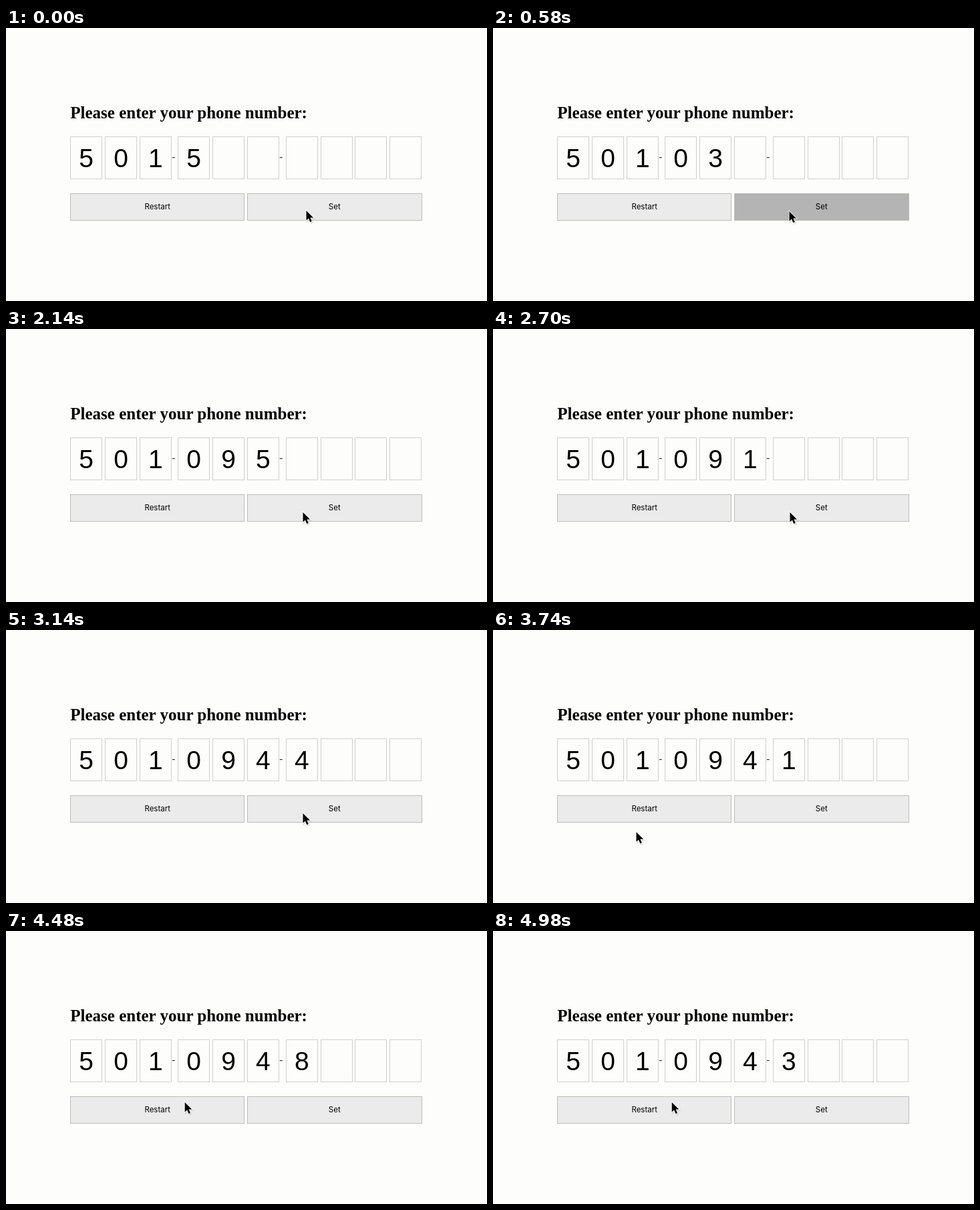
Recreate the animation shown at these times as an HTML page. Size 720 by 408 pixels, loop 5000 ms.

```html
<!DOCTYPE html>
<html lang="en">
<head>
<meta charset="utf-8">
<title>Number picker</title>
<style>
  html, body { margin: 0; width: 100%; height: 100%; overflow: hidden; background: #fdfdfc; }
  svg { display: block; width: 720px; height: 408px; }
  .title { font: bold 25px "Liberation Serif", Times, serif; }
  .digit { font: 39px "Liberation Sans", Arial, sans-serif; text-anchor: middle; }
  .dash { font: 15px "Liberation Serif", Times, serif; fill: #222; }
  .label { font: 11.5px Inter, sans-serif; text-anchor: middle; }
  .box { fill: none; stroke: #cfcfcf; }
  .button { fill: #ebebeb; stroke: #bcbcb8; }
</style>
</head>
<body>
<svg id="stage" viewBox="0 0 720 408">
  <text class="title" x="96.3" y="135">Please enter your phone number:</text>
  <g id="slots"></g>
  <text class="dash" x="248.2" y="196.8">-</text>
  <text class="dash" x="409.2" y="196.8">-</text>
  <rect class="button" x="96.5" y="247.5" width="260" height="40"/>
  <rect class="button" id="set" x="361.5" y="247.5" width="261" height="40"/>
  <text class="label" x="226.7" y="271">Restart</text>
  <text class="label" x="491.8" y="271">Set</text>
  <g id="cursor">
    <path d="M0 0V14.6L3.4 11.4L5.8 17L8.3 16L5.9 10.5H10.6Z" transform="translate(1 1.5)"
      fill="#aaa" stroke="#aaa" stroke-width="2" opacity=".35"/>
    <path d="M0 0V14.6L3.4 11.4L5.8 17L8.3 16L5.9 10.5H10.6Z"
      stroke="#fff" stroke-width="1.6" paint-order="stroke"/>
  </g>
</svg>
<script>
  const LOOP = 5000, TICK = 98.5, PRESS = 115;
  const SVG = "http://www.w3.org/2000/svg";
  const slots = document.getElementById("slots");
  const setButton = document.getElementById("set");
  const cursor = document.getElementById("cursor");

  // Each spinning slot counts up from `first` until the next press.
  const spins = [
    { slot: 3, start: 0, first: 5 },
    { slot: 4, start: 540, first: 3 },
    { slot: 5, start: 1158, first: 6 },
    { slot: 6, start: 2947, first: 3 }
  ];

  const path = [
    { t: 0, x: 449.5, y: 273 },
    { t: 480, x: 443.5, y: 274 },
    { t: 1300, x: 443.5, y: 274 },
    { t: 1700, x: 444.5, y: 274 },
    { t: 3340, x: 444.5, y: 274 },
    { t: 3740, x: 214.5, y: 302 },
    { t: 3800, x: 206, y: 320 },
    { t: 4240, x: 267.7, y: 256 }
  ];

  function add(name, attributes) {
    const node = slots.appendChild(document.createElementNS(SVG, name));
    for (const key in attributes) node.setAttribute(key, attributes[key]);
    return node;
  }

  const digits = Array.from({ length: 10 }, (_, i) => {
    const x = 96.5 + i * 51.8 + (i > 2 ? 5.6 : 0) + (i > 5 ? 6.3 : 0);
    add("rect", { class: "box", x: Math.floor(x) + 0.5, y: 162.5, width: 47, height: 63 });
    return add("text", { class: "digit", x: x + 23.7, y: 208 });
  });
  [5, 0, 1].forEach((value, i) => { digits[i].textContent = value; });

  function cursorAt(t) {
    const next = path.findIndex(point => point.t > t);
    if (next < 0) return path[path.length - 1];
    const a = path[next - 1], b = path[next];
    const u = (t - a.t) / (b.t - a.t), k = u * u * (3 - 2 * u);
    return { x: a.x + (b.x - a.x) * k, y: a.y + (b.y - a.y) * k };
  }

  function draw(t) {
    let pressed = false;
    spins.forEach(({ slot, start, first }, i) => {
      const end = i + 1 < spins.length ? spins[i + 1].start : LOOP;
      const ticks = Math.floor((Math.min(t, end - 1) - start) / TICK);
      digits[slot].textContent = t < start ? "" : (first + ticks) % 10;
      if (i > 0 && t >= start && t < start + PRESS) pressed = true;
    });
    setButton.style.fill = pressed ? "#b4b4b4" : "";
    const { x, y } = cursorAt(t);
    cursor.setAttribute("transform", `translate(${x} ${y})`);
  }

  const began = performance.now();
  function frame() {
    draw((performance.now() - began) % LOOP);
    requestAnimationFrame(frame);
  }
  frame();
</script>
</body>
</html>
```
